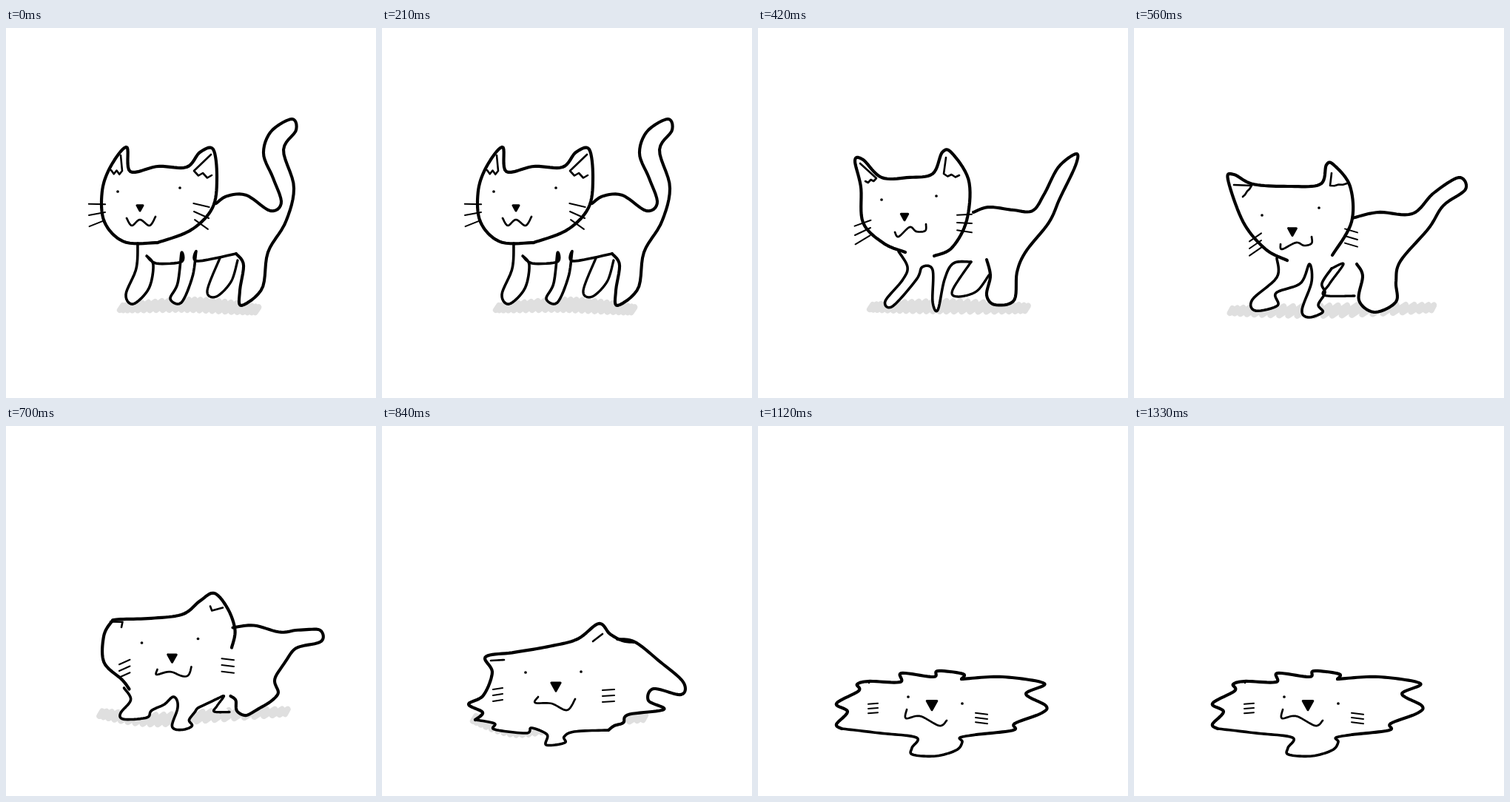
An HTML page with a canvas that plays this animation: 500x500 px, repeating every 1.4 s.

```html
<!DOCTYPE html>
<html lang="en">
<head>
<meta charset="utf-8">
<title>Melting cat</title>
<style>
html, body { margin: 0; height: 100%; overflow: hidden; background: #fff; }
canvas { display: block; width: 100vw; height: 100vh; }
</style>
</head>
<body>
<canvas id="stage" width="500" height="500"></canvas>
<script>
const ctx = document.getElementById('stage').getContext('2d');
const LOOP = 1400, STEP = 70;
// Moments at which the five poses (standing ... puddle) are reached.
const KEYS = [210, 420, 560, 840, 1120];

// A part has a few key points per pose; a spline joins them.
const part = (...poses) => poses.map(pose => pose.split(' ').map(pair => pair.split(',').map(Number)));

const head = part(
  '205,290 160,289 133,262 130,220 142,186 163,161 168,194 205,187 244,188 262,168 280,164 285,203 279,243 250,273 205,290',
  '199,303 170,291 142,263 139,215 131,179 142,178 167,202 203,202 236,197 249,168 262,169 285,207 282,260 262,297 238,308',
  '207,314 178,299 148,263 127,205 135,198 161,211 210,214 252,211 260,185 270,185 292,214 294,262 268,307',
  '126,397 136,387 117,376 137,364 149,333 140,312 178,306 225,298 264,288 293,267 308,281 325,290 342,292',
  '113,409 106,403 121,386 106,375 136,358 134,349 150,345 192,346 194,334 237,339 243,331 277,335 275,342');
const back = part(
  '284,237 299,227 325,226 357,247 372,236 361,203 348,170 358,140 386,123 392,138 375,165 389,215 378,262 354,303 346,352 318,375 316,355 321,320 311,305',
  '291,249 312,242 345,246 371,247 387,224 406,188 430,170 429,186 408,230 393,263 362,302 350,330 346,368 320,374 309,361 314,335 309,313',
  '295,257 330,249 376,251 405,223 439,202 448,218 418,240 398,271 360,315 354,343 354,370 325,384 304,368 309,335 301,319',
  '318,288 342,292 375,318 407,346 404,363 367,355 360,371 381,383 333,390 326,401 314,405 306,411',
  '275,342 330,339 387,348 362,362 389,378 383,388 347,402 345,411 295,417');
const front = part(
  '178,291 176,325 162,360 172,373 193,352 199,320 190,308 203,318 237,316 237,304 232,345 222,366 237,371 252,336 257,302 258,315 311,305',
  '190,302 202,323 195,341 172,369 182,376 214,340 222,323 236,327 236,370 243,381 252,340 264,318 288,316',
  '193,311 193,337 160,367 164,382 194,375 192,358 225,345 237,319 240,343 227,381 236,391 255,384 249,374 258,358 254,345 267,325',
  '126,397 152,402 152,410 195,415 202,408 223,417 222,431 247,428 246,420 260,413 306,411',
  '113,409 165,415 214,421 208,435 209,444 240,446 268,438 276,427 273,421 295,417');
const farLeg = part('289,311 272,355 284,363 304,343 313,314', '288,316 263,354 270,363 295,356 312,334',
  '267,325 283,319 264,346 257,361 298,362', '306,411', '295,417');
const shadow = part('155,378 250,374 340,381', '152,377 250,376 364,379', '130,382 260,382 405,378',
  '124,395 185,411 260,401 356,394', '150,385 340,385');

const mouth = part('163,257 170,267 181,259 194,267 202,255', '185,276 190,282 205,269 214,275 226,274 227,265',
  '198,292 200,299 219,290 230,294 240,291 240,282', '211,366 207,374 229,375 250,384 261,369',
  '201,383 200,395 219,392 245,405 255,398');
const nose = part('181,243', '198,255', '214,275', '235,352', '235,377');
const eyes = [part('151,221', '167,232', '173,253', '194,333', '203,366'),
  part('235,216', '241,227', '250,243', '269,332', '276,375')];
// Inner ear: top of the fold, then both ends of the tuft.
const ears = [part('155,172 157,193 142,192', '138,183 160,203 145,207', '135,212 159,213 147,228', '147,317 165,316', '150,347'),
  part('277,171 254,193 278,199', '254,175 251,197 272,199', '267,196 265,213 288,210', '285,291 298,281', '260,333')];
// Middle whisker of each cheek.
const whiskers = [part('112,253 134,249', '131,280 152,270', '156,298 172,287', '150,364 163,362', '149,382 162,381'),
  part('254,248 274,257', '269,263 289,264', '285,281 302,286', '298,365 314,364', '294,394 310,396')];

const mix = (a, b, k) => [0, 1].map(c => a[c] + (b[c] - a[c]) * k);

// Catmull-Rom point at u = 0..1.
function sample(points, u) {
  const last = points.length - 1, i = Math.floor(u * last), t = u * last - i;
  const [p, q, r, s] = [-1, 0, 1, 2].map(n => points[Math.max(0, Math.min(i + n, last))]);
  return [0, 1].map(c => q[c] + t / 2 * (r[c] - p[c]
    + t * (2 * p[c] - 5 * q[c] + 4 * r[c] - s[c] + t * (3 * (q[c] - r[c]) + s[c] - p[c]))));
}

// The part between its two nearest poses, as a list of points.
function shape(poses, phase, count = 120) {
  const i = Math.floor(phase), a = poses[i], b = poses[i + 1] || a;
  return Array.from({ length: count }, (_, n) => {
    const u = n / Math.max(1, count - 1);
    return mix(sample(a, u), sample(b, u), phase - i);
  });
}

function progress(time) {
  const last = KEYS.length - 1;
  if (time <= KEYS[0]) return 0;
  if (time >= KEYS[last]) return last;
  const i = KEYS.findIndex(key => key > time) - 1;
  const k = (time - KEYS[i]) / (KEYS[i + 1] - KEYS[i]);
  if (i === 0) return k ** 1.5;
  return i + (i === last - 1 ? 1 - (1 - k) ** 1.5 : k);
}

function trace(points) {
  ctx.beginPath();
  for (const point of points) ctx.lineTo(...point);
}

function stroke(points, width, color = '#000') {
  trace(points);
  ctx.lineWidth = width;
  ctx.strokeStyle = color;
  ctx.stroke();
}

function fill(points, color) {
  trace(points);
  ctx.fillStyle = color;
  ctx.fill();
}

function drawShadow(phase) {
  const scribble = shape(shadow, phase, 50).map(([x, y], n, all) => {
    const reach = (n % 2 ? 1 : -1) * (3 + 4 * Math.sin(Math.PI * n / all.length));
    return [x - reach, y + reach];
  });
  stroke(scribble, 8, '#dfdfdf');
}

function drawBody(phase) {
  const [top, rear, legs, far] = [head, back, front, farLeg].map(p => shape(p, phase));
  fill(far, '#fff');
  fill([...top, ...rear, ...legs.slice().reverse()], '#fff');
  stroke(far, 3.3);
  stroke(legs, 3.6);
  stroke(rear, 4.1);
  stroke(top, 4.2);
}

function drawEar(poses, phase) {
  const [fold, from, to] = shape(poses, phase, 3);
  const depth = Math.max(0, 5 - 2 * phase);
  const tuft = [0, 1, 2, 3, 4].map(n => {
    const [x, y] = mix(from, to, n / 4);
    return [x, y + n % 2 * depth];
  });
  stroke([fold, ...tuft], 2.6);
}

// Three whiskers that fan out while standing and close up while melting.
function drawWhiskers(poses, phase, side) {
  const [a, b] = shape(poses, phase, 2), [x, y] = mix(a, b, 0.5);
  const half = Math.hypot(b[0] - a[0], b[1] - a[1]) / 2;
  const tilt = Math.atan2(b[1] - a[1], b[0] - a[0]);
  const gap = 13 - 1.7 * phase, fan = Math.max(0, 0.2 - 0.1 * phase);
  for (const n of [-1, 0, 1]) {
    const angle = tilt + n * fan * side;
    const dx = half * Math.cos(angle), dy = half * Math.sin(angle);
    stroke([[x - dx, y + n * gap - dy], [x + dx, y + n * gap + dy]], 2);
  }
}

function drawFace(phase) {
  ears.forEach(ear => drawEar(ear, phase));
  whiskers.forEach((group, i) => drawWhiskers(group, phase, i ? 1 : -1));
  stroke(shape(mouth, phase, 40), 2.7);

  const [[x, y]] = shape(nose, phase, 1), r = 4 + 0.7 * phase;
  const triangle = [[x - r, y - r * 0.8], [x + r, y - r * 0.8], [x, y + r], [x - r, y - r * 0.8]];
  fill(triangle, '#000');
  stroke(triangle, 3);

  for (const eye of eyes) {
    const [dot] = shape(eye, phase, 1);
    stroke([dot, dot], 3.7);
  }
}

function draw(time) {
  const phase = progress(time);
  ctx.fillStyle = '#fff';
  ctx.fillRect(0, 0, 500, 500);
  drawShadow(phase);
  drawBody(phase);
  drawFace(phase);
}

ctx.lineCap = ctx.lineJoin = 'round';
const start = performance.now();
function tick() {
  const time = (performance.now() - start) % LOOP;
  draw(Math.floor(time / STEP) * STEP);
  requestAnimationFrame(tick);
}
tick();
</script>
</body>
</html>
```
